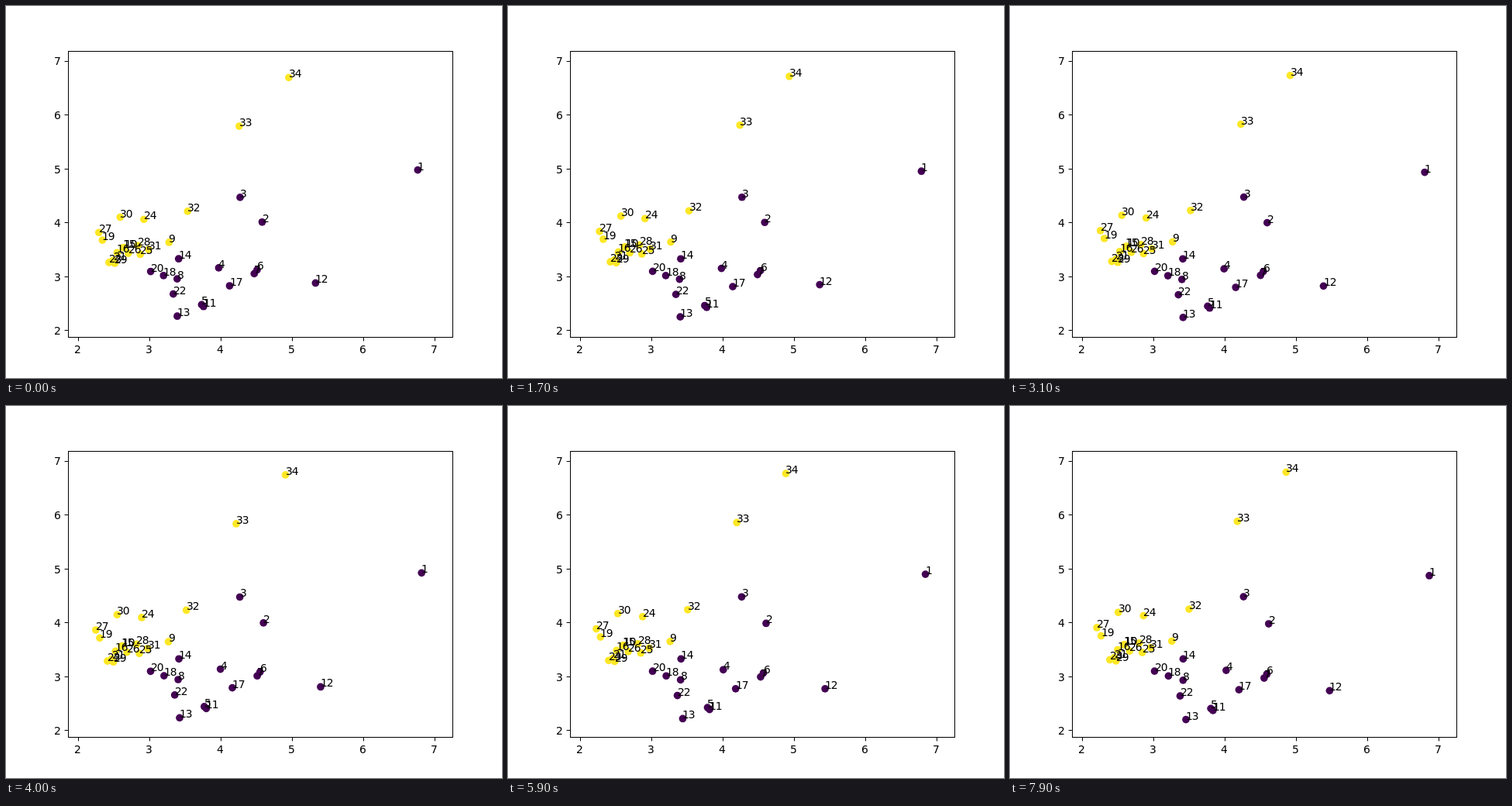
An HTML page with a canvas for the animation above (8000 ms loop, 640 by 480 pixels).

```html
<!DOCTYPE html>
<html lang="en">
<head>
<meta charset="utf-8">
<title>Scatter plot</title>
<style>
html, body { margin: 0; width: 100%; height: 100%; overflow: hidden; background: #fff; }
canvas { display: block; }
</style>
</head>
<body>
<canvas id="plot" width="640" height="480"></canvas>
<script>
const ctx = document.getElementById('plot').getContext('2d');
const LOOP = 8000, STEP = 100, LAST = LOOP / STEP - 1;
const PURPLE = '#440154', YELLOW = '#fde725';

// Where each node is halfway through the loop, in label order.
const centres = [
  [536.2, 215.3], [332.2, 279.9], [301.7, 246.5], [276.7, 339.5], [255.8, 387.9],
  [327.7, 343.2], [324.1, 348.2], [222.1, 353], [209.6, 304.2], [150.4, 309.7],
  [258.4, 390.3], [405.9, 362.4], [224, 402.4], [223.1, 326.3], [149, 310],
  [141.2, 316.4], [292, 363.6], [203.9, 348.1], [121, 299.4], [186.6, 342.3],
  [136.6, 326.3], [217.7, 372.9], [130.9, 329.2], [175.1, 273], [172, 319.3],
  [156.1, 317.6], [115.9, 289.1], [168.5, 307.5], [138.6, 330.4], [143.5, 269.4],
  [182.7, 313], [232.7, 263.5], [297.1, 152], [360.6, 88.9]
];

// The two classes drift apart: speed grows with distance from a dividing line.
const nodes = centres.map(([x, y], i) => {
  const dx = 0.0537 * x + 0.0698 * y - 34.1;
  const dy = 0.78 * dx - 0.3;
  return { x, y, dx, dy, label: i + 1, colour: dx < -1 ? YELLOW : PURPLE };
});

function line(x1, y1, x2, y2) {
  ctx.beginPath();
  ctx.moveTo(x1, y1);
  ctx.lineTo(x2, y2);
  ctx.stroke();
}

function drawAxes() {
  ctx.strokeRect(80.5, 58.5, 496, 369);
  for (let i = 0; i < 6; i++) {
    const x = 92.55 + 92.05 * i, tickX = Math.round(x) + 0.5;
    const y = 418.48 - 69.52 * i, tickY = Math.round(y) + 0.5;
    line(tickX, 427.5, tickX, 432.4);
    line(75.6, tickY, 80.5, tickY);
    ctx.fillText(i + 2, Math.round(x - 4.5), 448);
    ctx.fillText(i + 2, 62, Math.round(y + 5.6));
  }
}

function draw(progress) {
  const k = progress - 0.5;
  const points = nodes.map(n => ({ ...n, x: n.x + n.dx * k, y: n.y + n.dy * k }));
  ctx.fillStyle = '#fff';
  ctx.fillRect(0, 0, 640, 480);
  for (const p of points) {
    ctx.fillStyle = p.colour;
    ctx.beginPath();
    ctx.arc(p.x, p.y, 4.86, 0, 2 * Math.PI);
    ctx.fill();
  }
  ctx.fillStyle = ctx.strokeStyle = '#000';
  ctx.lineWidth = 1;
  ctx.font = '13.89px "DejaVu Sans", sans-serif';
  ctx.letterSpacing = '-1px';
  drawAxes();
  for (const p of points) ctx.fillText(p.label, Math.round(p.x), Math.round(p.y));
}

function tick() {
  draw(Math.floor(performance.now() % LOOP / STEP) / LAST);
  requestAnimationFrame(tick);
}
tick();
</script>
</body>
</html>
```
